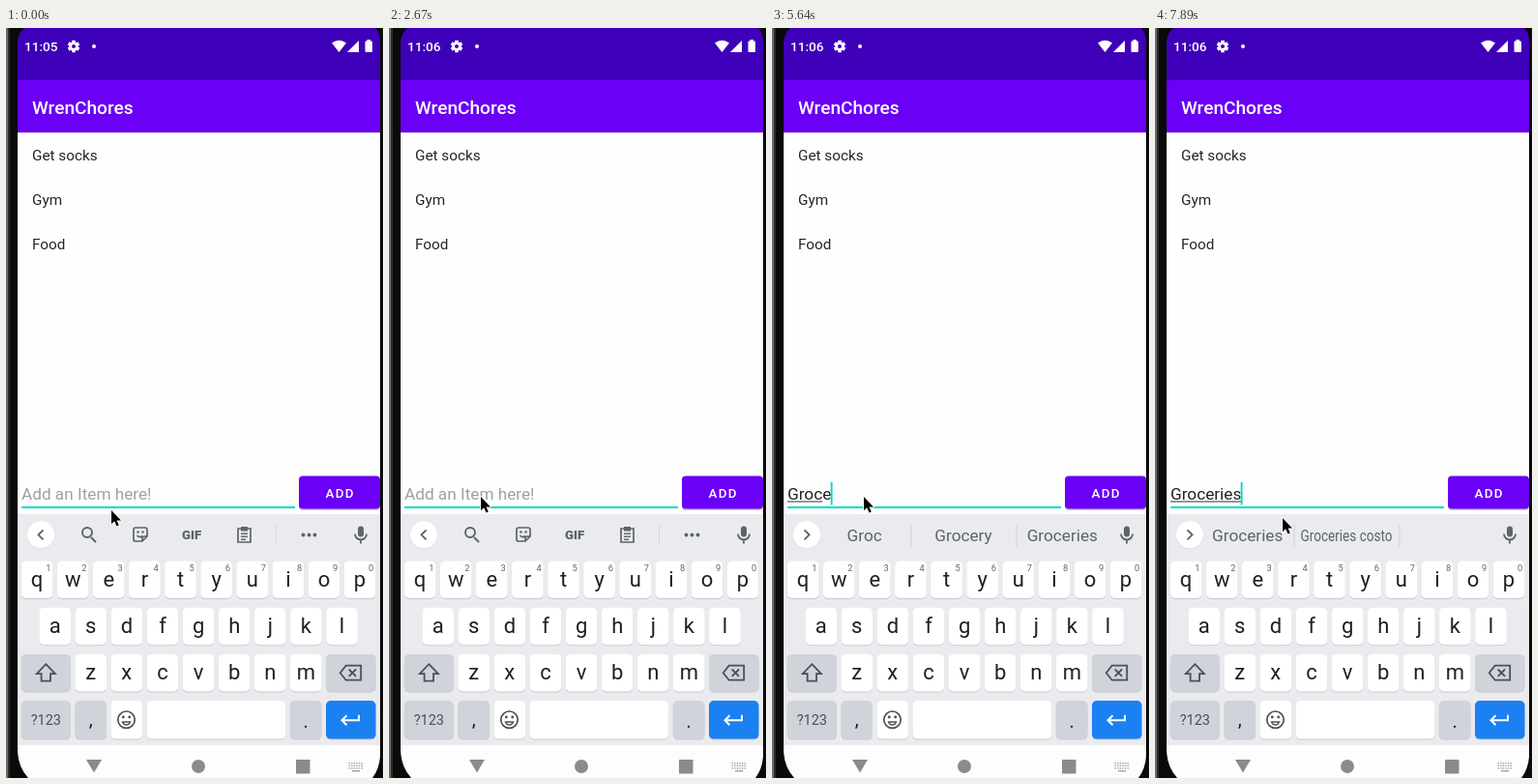
An HTML page with a canvas that plays this animation: 390x776 px, repeating every 8 s.

```html
<!DOCTYPE html>
<html lang="en">
<head>
<meta charset="utf-8">
<title>Todo list</title>
<style>
  html, body { margin: 0; width: 100%; height: 100%; overflow: hidden; background: #0a0a0a; }
  canvas { display: block; width: 390px; height: 776px; }
</style>
</head>
<body>
<canvas id="stage"></canvas>
<script>
const W = 390, H = 776, LOOP = 8000;
const canvas = document.getElementById('stage');
const ctx = canvas.getContext('2d');
const dpr = window.devicePixelRatio || 1;
canvas.width = W * dpr;
canvas.height = H * dpr;

const PURPLE = '#6a00f5', DARK = '#3f00b9', TEAL = '#03d9c8';
const KEYBOARD = '#e9ebee', GREY_KEY = '#d0d3d9', ICON = '#5f6368', INK = '#1f2022';
const FIELD_X = 16, FIELD_SIZE = 17.2;

// Each track holds [time, ...values]; a value stays until the next entry.
const clock = [[0, '11:05'], [890, '11:06']];

const pointer = [
  [0, 109, 499], [150, 116, 500], [300, 108, 499], [440, 96, 497], [590, 88, 495],
  [740, 86, 494], [890, 89, 493], [1030, 92, 491], [1180, 94, 490], [1330, 96, 488],
  [1620, 95, 485], [7440, 51, 518], [7590, 120, 554], [7740, 208, 537], [7890, 132, 507]
];

const caret = [
  [0, false], [300, true], [740, false], [1180, true], [1770, false], [2220, true],
  [2670, false], [3120, true], [3860, false], [4300, true], [6840, false], [7290, true]
];

const WORD = 'Groceries';
const typing = [0, 3260, 4900, 5190, 5490, 5640, 5790, 5940, 6090, 6240]
  .map((t, i) => [t, WORD.slice(0, i)]);

const hints = [
  [0],
  [3410, 'G', 'H', 'Get'],
  [5040, 'Gr', 'Great', 'He'],
  [5490, 'Gro', 'Grow', WORD],
  [5640, 'Groc', 'Grocery', WORD],
  [5790, 'Groce', 'Grocery', WORD],
  [5940, 'Grocer', 'Grocery', WORD],
  [6090, 'Groceri', WORD, ''],
  [6240, 'Grocerie', WORD, ''],
  [6690, WORD, WORD + ' costo', '']
];

function at(track, t) {
  let hit = track[0];
  for (const step of track) if (step[0] <= t) hit = step;
  return hit.slice(1);
}

function rect(x, y, w, h, color) {
  ctx.fillStyle = color;
  ctx.fillRect(x, y, w, h);
}

function box(x, y, w, h, r, color) {
  ctx.fillStyle = color;
  ctx.beginPath();
  ctx.roundRect(x, y, w, h, r);
  ctx.fill();
}

function disc(x, y, r, color) {
  ctx.fillStyle = color;
  ctx.beginPath();
  ctx.arc(x, y, r, 0, Math.PI * 2);
  ctx.fill();
}

function setFont(size, weight = 400) {
  ctx.font = `${weight} ${size}px Roboto, sans-serif`;
}

function text(str, x, y, size, color, weight = 400, align = 'left', max) {
  setFont(size, weight);
  ctx.textAlign = align;
  ctx.fillStyle = color;
  ctx.fillText(str, x, y, max);
}

function fillPath(d, x, y, color) {
  ctx.save();
  ctx.translate(x, y);
  ctx.fillStyle = color;
  ctx.fill(new Path2D(d), 'evenodd');
  ctx.restore();
}

function strokePath(d, x, y, color, width) {
  ctx.save();
  ctx.translate(x, y);
  ctx.strokeStyle = color;
  ctx.lineWidth = width;
  ctx.stroke(new Path2D(d));
  ctx.restore();
}

function drawGear(x, y) {
  ctx.save();
  ctx.translate(x, y);
  for (let i = 0; i < 6; i++) {
    rect(-1.8, -6.2, 3.6, 3, '#fff');
    ctx.rotate(Math.PI / 3);
  }
  ctx.restore();
  disc(x, y, 4.7, '#fff');
  disc(x, y, 2, DARK);
}

function drawStatusBar(time) {
  rect(12, 0, 375, 54, DARK);
  text(time, 19, 24, 13.6, '#fff', 500);
  drawGear(70, 19);
  disc(91, 19, 2, '#fff');
  fillPath('M0 6 L-7.5 -3.4 Q0 -9 7.5 -3.4 Z', 344.5, 19, '#fff');
  fillPath('M0 12 L12 0 V12 Z', 353, 13, '#fff');
  box(371.5, 13.5, 7.5, 11.5, 1, '#fff');
  rect(373.5, 12, 3.5, 2, '#fff');
}

function drawApp(time) {
  rect(12, 0, 375, H, '#fefefe');
  drawStatusBar(time);
  rect(12, 108, 375, 1, '#d9d5e2');
  rect(12, 54, 375, 54, PURPLE);
  text('WrenChores', 27, 89, 19.1, '#fff', 500);
  ['Get socks', 'Gym', 'Food'].forEach((item, i) =>
    text(item, 27, 137 + i * 45.9, 15.3, '#252525'));
}

function drawField(word, marked, showCaret) {
  rect(FIELD_X, 495, 283, 2, TEAL);
  if (word) text(word, FIELD_X, 488, FIELD_SIZE, '#222');
  else text('Add an Item here!', FIELD_X, 488, FIELD_SIZE, '#a0a0a0');
  setFont(FIELD_SIZE);
  if (marked) rect(FIELD_X, 489.5, ctx.measureText(marked).width, 1, '#333');
  if (showCaret) rect(15.4 + ctx.measureText(word).width, 470, 1.9, 23.5, TEAL);

  box(303, 465, 84, 34, 4, '#c9c5d2');
  box(303, 463.5, 84, 34, 4, PURPLE);
  ctx.letterSpacing = '1.2px';
  text('ADD', 345.6, 486, 13.4, '#fff', 500, 'center');
  ctx.letterSpacing = '0px';
}

function drawTools() {
  strokePath('M4 4 L9 9 M5 -1 A5 5 0 1 1 -5 -1 A5 5 0 1 1 5 -1', 84, 523, ICON, 1.9);
  strokePath('M-5 -7 H5 Q7 -7 7 -5 V2 L2 7 H-5 Q-7 7 -7 5 V-5 Q-7 -7 -5 -7 M7 2 H4 Q2 2 2 4 V7 M-3.5 1 Q-1 4 2 1.5', 139, 524, ICON, 1.7);
  disc(136.5, 521.5, 1.2, ICON);
  disc(141.5, 521.5, 1.2, ICON);
  text('GIF', 192, 529, 13.2, ICON, 900, 'center');
  strokePath('M-6.5 -6 H6.5 V8 H-6.5 Z', 246.5, 524, ICON, 1.7);
  rect(243, 516, 7, 4.5, ICON);
  for (let i = 0; i < 3; i++) rect(243, 522.5 + i * 3, i === 2 ? 5 : 7, 1.4, ICON);
  rect(279, 515, 1, 20, '#d5d7da');
  for (let i = -1; i < 2; i++) disc(313.5 + i * 6, 524.5, 1.9, ICON);
}

function drawHints(words) {
  rect(143.5, 514, 1, 23, '#cfd1d5');
  rect(252.5, 514, 1, 23, '#cfd1d5');
  // Long phrases are condensed to stay inside their slot.
  words.forEach((word, i) =>
    text(word, 95.7 + i * 102.3, 531, FIELD_SIZE, ICON, 400, 'center', 95));
}

function drawStrip(words) {
  disc(36, 525, 14.3, '#dddfe3');
  disc(36, 524.3, 14, '#fff');
  const open = words.length > 0;
  strokePath(open ? 'M-2.5 -5 L2.5 0 L-2.5 5' : 'M2.5 -5 L-2.5 0 L2.5 5', 36, 524.3, ICON, 1.9);
  if (open) drawHints(words);
  else drawTools();

  box(364, 515.5, 6, 11, 3, ICON);
  strokePath('M-6 0 A6 6 0 0 0 6 0 M0 6 V10', 367, 523.5, ICON, 1.8);
}

function key(x, y, w, color = '#fff', h = 38.5) {
  box(x, y + 1, w, h, 5, '#c8cace');
  box(x, y, w, h, 5, color);
}

function letterRow(letters, x, y, digits) {
  [...letters].forEach((ch, i) => {
    const left = x + i * 37.1;
    key(left, y, 32.6);
    text(ch, left + 16.3, y + 26.3, 22, INK, 400, 'center');
    if (digits) text((i + 1) % 10, left + 28, y + 10.5, 9.3, ICON, 400, 'center');
  });
}

function drawKeys() {
  letterRow('qwertyuiop', 15.8, 551.5, true);
  letterRow('asdfghjkl', 34.4, 599.7);
  letterRow('zxcvbnm', 71.4, 647.9);

  key(15.8, 647.9, 51, GREY_KEY);
  strokePath('M0 -9 L9.5 1 H4.7 V8.5 H-4.7 V1 H-9.5 Z', 41.3, 667.2, '#4b4f54', 1.8);
  key(331, 647.9, 51.5, GREY_KEY);
  strokePath('M-11 0 L-5 -7.5 H10.5 V7.5 H-5 Z M-2 -3.7 L5.4 3.7 M5.4 -3.7 L-2 3.7', 356.7, 667.2, '#4b4f54', 1.8);

  const y = 696.1, h = 39.5;
  key(15.8, y, 51, GREY_KEY, h);
  text('?123', 41.3, 721, 14.5, '#4b4f54', 400, 'center');
  key(71.4, y, 32.6, GREY_KEY, h);
  text(',', 87.7, 722, 20, INK, 400, 'center');
  key(108.5, y, 32.6, '#fff', h);
  strokePath('M8.7 0 A8.7 8.7 0 1 1 -8.7 0 A8.7 8.7 0 1 1 8.7 0', 124.5, 715.7, '#4b4f54', 1.7);
  disc(121.3, 713, 1.4, '#4b4f54');
  disc(127.7, 713, 1.4, '#4b4f54');
  fillPath('M-5 1.5 H5 Q3.5 6 0 6 Q-3.5 6 -5 1.5 M-3 3 Q0 6 3 3 Z', 124.5, 715.7, '#4b4f54');
  key(145.5, y, 143.8, '#fff', h);
  key(293.8, y, 32.6, GREY_KEY, h);
  text('.', 310.2, 724, 20, INK, 400, 'center');
  key(331, y, 51.5, '#1b80f2', h);
  strokePath('M9 -5 V0.5 H-8 M-3.5 -4.5 L-8.5 0.5 L-3.5 5.5', 356, 715.7, '#fff', 2);
}

function drawNav() {
  const grey = '#8b8b8b';
  rect(12, 742, 375, 34, '#fdfdfd');
  fillPath('M-8 -6.5 H8 L0 7 Z', 91, 763.5, grey);
  disc(199, 764, 7, grey);
  rect(300, 757, 14.5, 14.5, grey);
  for (let r = 0; r < 3; r++)
    for (let c = 0; c < 6; c++) rect(354.5 + c * 2.6, 760 + r * 2.6, 1.4, 1.4, '#a0a0a0');
  rect(358, 768, 8, 1.4, '#a0a0a0');
}

function drawBezel() {
  rect(0, 0, 12, H, '#0a0a0a');
  rect(0, 0, 2, H, '#686868');
  rect(2, 0, 2, H, '#292929');
  rect(387, 0, 3, H, '#0a0a0a');
  fillPath('M0 0 H7 Q1 5 0 14 Z', 12, 0, '#0a0a0a');
  fillPath('M0 0 H-5 Q-1 4 0 11 Z', 387, 0, '#0a0a0a');
  fillPath('M0 0 H11 Q1 -11 0 -27 Z', 12, H, '#0a0a0a');
  fillPath('M0 0 H-8 Q-1 -9 0 -22 Z', 387, H, '#0a0a0a');
}

function drawPointer([x, y]) {
  const arrow = 'M0 0 V14.3 L3.2 11.3 L5.5 16.5 L7.8 15.5 L5.6 10.5 H10 Z';
  ctx.lineJoin = 'round';
  strokePath(arrow, x, y, '#fff', 1.8);
  fillPath(arrow, x, y, '#000');
  ctx.lineJoin = 'miter';
}

function draw(t) {
  const [word] = at(typing, t);
  const words = at(hints, t);
  ctx.setTransform(dpr, 0, 0, dpr, 0, 0);
  drawApp(at(clock, t)[0]);
  drawField(word, words[0], at(caret, t)[0]);
  rect(12, 503, 375, 239, KEYBOARD);
  drawStrip(words);
  drawKeys();
  drawNav();
  drawBezel();
  drawPointer(at(pointer, t));
}

const start = performance.now();
function loop() {
  draw((performance.now() - start) % LOOP);
  requestAnimationFrame(loop);
}
loop();
</script>
</body>
</html>
```
